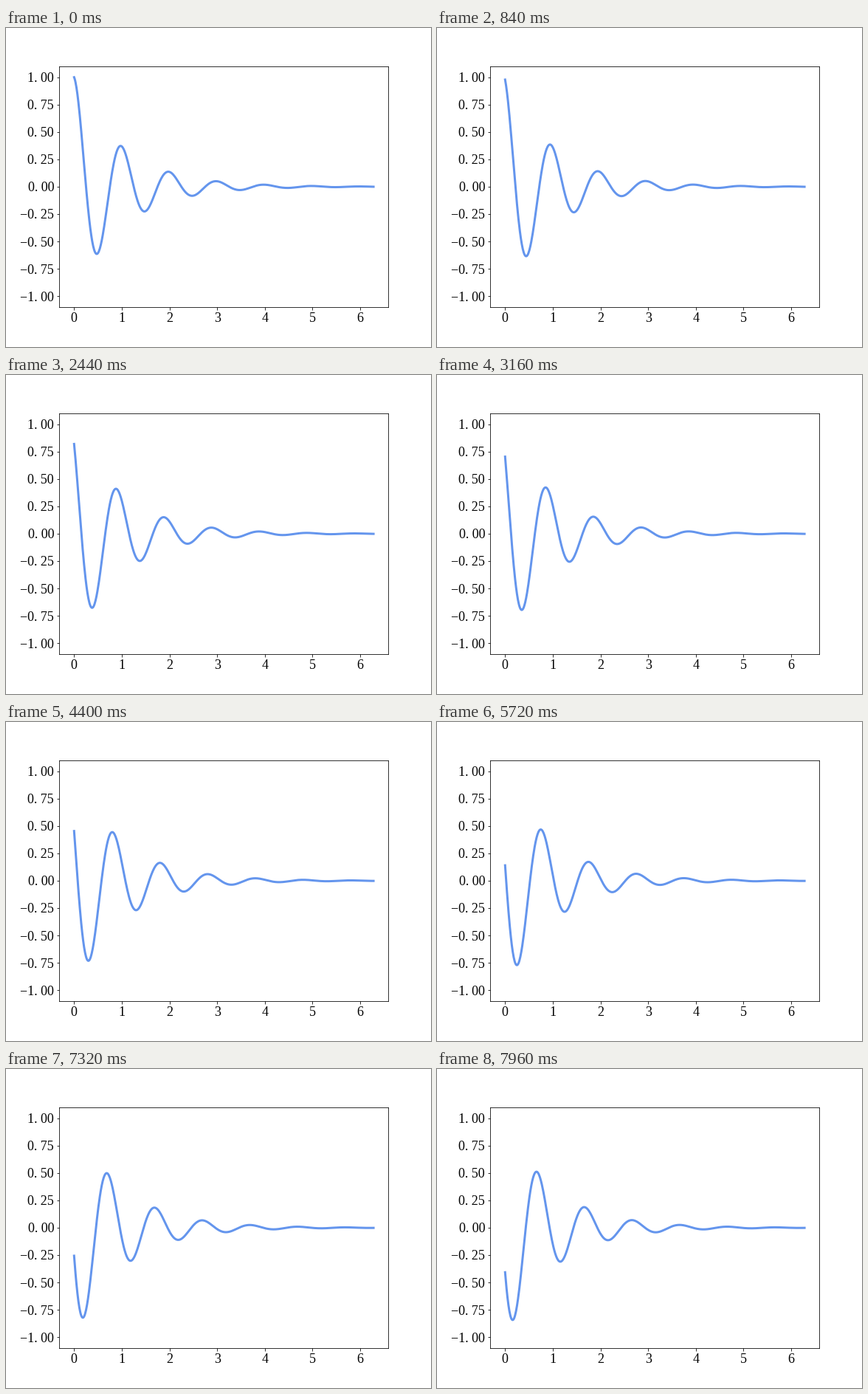
A matplotlib script that plays this animation: 576x432 px, repeating every 8 s.

```python
import numpy as np
import matplotlib.pyplot as plt
from matplotlib.animation import FuncAnimation

FRAMES, INTERVAL = 200, 40

plt.rcParams.update({"font.family": "Liberation Serif", "font.size": 18})


def decimal_label(value, _pos=None):
    """Two decimals; the point fills a full digit cell."""
    return f"{value:.2f}".replace("-", "\u2212").replace(".", ". ")


fig, ax = plt.subplots(figsize=(8, 6), dpi=72)
fig.subplots_adjust(left=0.125, right=0.9, bottom=0.125, top=0.88)

x = np.arange(0, 2 * np.pi, 0.01)
line, = ax.plot(x, np.exp(-x) * np.cos(2 * np.pi * x),
                color="cornflowerblue", lw=3)
ax.set_ylim(-1.1, 1.1)
ax.set_xticks(range(7))
ax.set_yticks(np.linspace(-1, 1, 9))
ax.yaxis.set_major_formatter(decimal_label)


def update(i):
    line.set_ydata(np.exp(-x) * np.cos(2 * np.pi * x + i / 100))
    return line,


anim = FuncAnimation(fig, update, frames=FRAMES, interval=INTERVAL,
                     repeat=True, repeat_delay=0)
plt.show()
```
